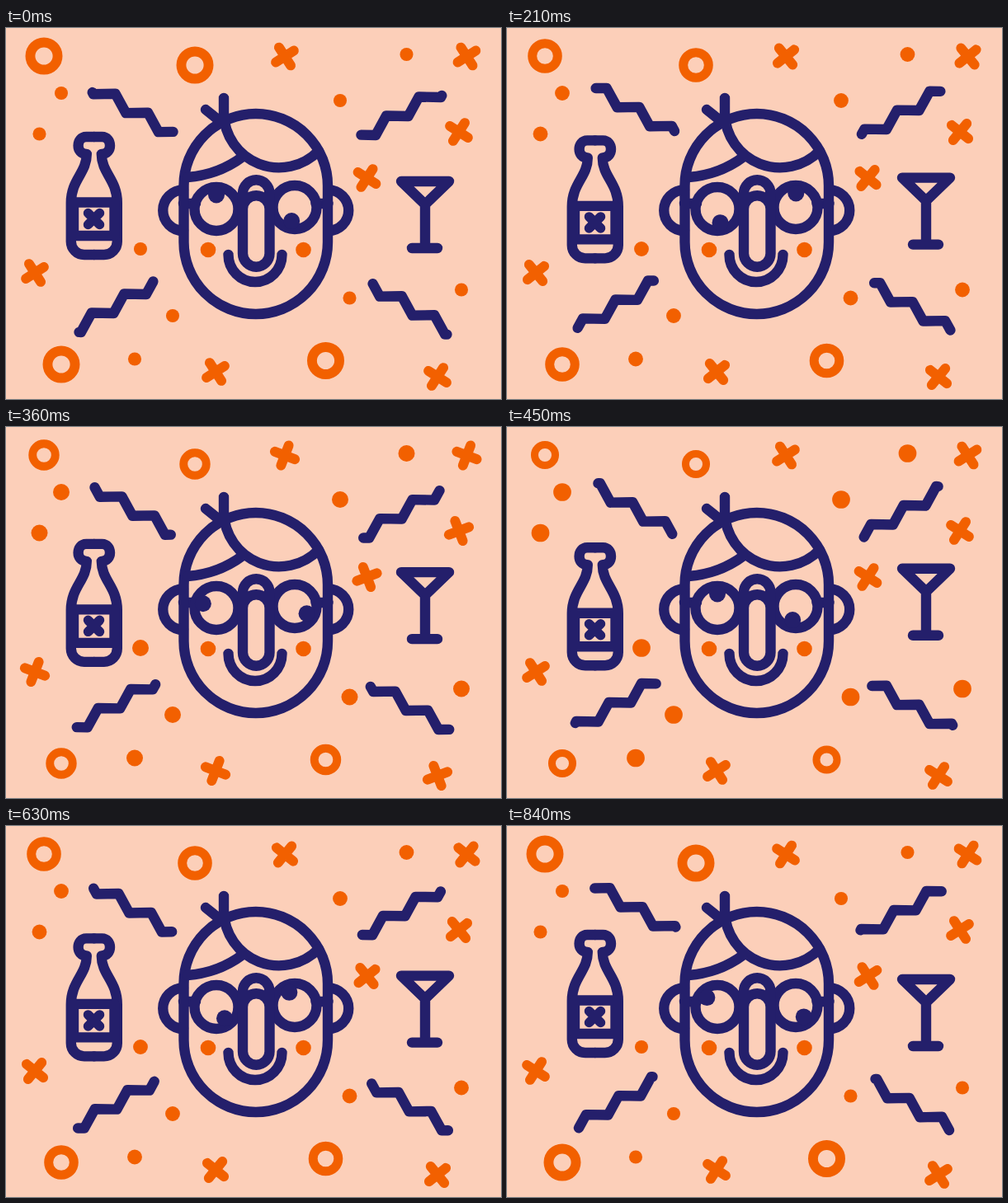
An HTML page for the animation above (0.9 s loop, 600 by 450 pixels).

```html
<!DOCTYPE html>
<html lang="en">
<head>
<meta charset="utf-8">
<title>Dizzy party face</title>
<style>
  html, body { margin: 0; width: 100%; height: 100%; overflow: hidden; background: #fccfb9; }
  svg { display: block; width: 600px; height: 450px; }
  .ink { fill: none; stroke: #241f6b; stroke-width: 12.4; stroke-linecap: round; stroke-linejoin: round; }
  .pupil { fill: #241f6b; stroke: none; }
  .dot { fill: #f26000; stroke: none; }
  .line { fill: none; stroke: #f26000; stroke-width: 11.9; stroke-linecap: round; }
</style>
</head>
<body>
<svg viewBox="0 0 600 450">
  <defs>
    <circle id="ring" class="line" r="16.600"/>
    <circle id="dot" class="dot"/>
    <path id="cross" class="line" d="M-13 0H13M0-13V13"/>
    <path id="wave"/>
    <path id="flank" d="M0 132H-9.500C-22 132-23 153-9 153C-9 176-28 184-28 212V259a16 16 0 0 0 16 16H0"/>
    <g id="side">
      <path d="M215 196.500a24.750 24.750 0 0 0 0 49.500M215 213H230"/>
      <circle class="dot" cx="245" cy="269" r="9.300"/>
    </g>
  </defs>

  <g>
    <use href="#ring" x="46" y="34"/>
    <use href="#ring" x="229" y="45"/>
    <use href="#ring" x="67" y="408"/>
    <use href="#ring" x="387.500" y="403.500"/>
  </g>
  <g>
    <use href="#dot" x="67" y="79"/>
    <use href="#dot" x="40.500" y="128.500"/>
    <use href="#dot" x="405" y="88"/>
    <use href="#dot" x="485.500" y="32"/>
    <use href="#dot" x="163" y="268"/>
    <use href="#dot" x="202" y="349"/>
    <use href="#dot" x="156" y="401.500"/>
    <use href="#dot" x="416.500" y="327.500"/>
    <use href="#dot" x="552" y="317.500"/>
  </g>
  <g>
    <use href="#cross" x="338" y="34.500"/>
    <use href="#cross" x="558.500" y="34.500"/>
    <use href="#cross" x="35" y="297"/>
    <use href="#cross" x="254" y="417"/>
  </g>
  <!-- mirrored crosses spin the other way -->
  <g transform="scale(-1 1)">
    <use href="#cross" x="-549" y="126"/>
    <use href="#cross" x="-437.500" y="182"/>
    <use href="#cross" x="-523" y="423"/>
  </g>

  <g class="ink">
    <use href="#wave" transform="translate(154.500 100.500) rotate(30.200)"/>
    <use href="#wave" transform="translate(478.500 104.300) scale(-1 1) rotate(30.200)"/>
    <use href="#wave" transform="translate(132.600 336.700) rotate(-30.200)"/>
    <use href="#wave" transform="translate(490.400 339.400) scale(-1 1) rotate(-30.200)"/>
  </g>

  <g class="ink" id="bottle">
    <use href="#flank" x="106.800"/>
    <use href="#flank" x="-106.800" transform="scale(-1 1)"/>
    <path d="M82 211.500H131.500V252H82Z"/>
    <path d="M99.500 224.500l14 14m0-14l-14 14" stroke-width="11.500"/>
  </g>

  <path class="ink" id="glass" d="M479 186H537L508 214ZM508 214V267M492 267H523"/>

  <g class="ink">
    <use href="#side"/>
    <use href="#side" transform="translate(605.500) scale(-1 1)"/>
    <rect x="215.500" y="104" width="174.500" height="243" rx="87.250"/>
    <path d="M264 85V104A67 67 0 0 0 379 149M242 99L262 115M220 181Q258 178 287 156"/>
    <circle cx="255" cy="219.500" r="26.500"/>
    <circle cx="350" cy="217.500" r="26.500"/>
    <circle class="pupil" id="left" r="10"/>
    <circle class="pupil" id="right" r="10"/>
    <path d="M287 219.500a16.250 16.250 0 0 1 32.500 0V273.500a16.250 16.250 0 0 1-32.500 0ZM287 219V200.500a16.250 16.250 0 0 1 32.500 0V219"/>
    <path d="M269.500 275a32.500 33 0 0 0 65 0"/>
  </g>
</svg>
<script>
  const TAU = Math.PI * 2;
  const $ = id => document.getElementById(id);
  const set = (id, name, value) => $(id).setAttribute(name, value);

  const HALF = 54.3;   // half length of the wave's window
  const SEG = 22.85;   // length of one stroke of the zigzag
  const AMP = 6.9;

  // Triangle wave running through a fixed window
  function zigzag(shift) {
    const point = u => {
      const p = (((u - shift) / SEG) % 2 + 2) % 2;
      return `${u.toFixed(2)} ${(AMP * (1 - 2 * Math.abs(1 - p))).toFixed(2)}`;
    };
    const points = [point(-HALF)];
    const first = shift + Math.ceil((-HALF - shift) / SEG) * SEG;
    for (let u = first; u < HALF; u += SEG) points.push(point(u));
    points.push(point(HALF));
    return 'M' + points.join('L');
  }

  function look(id, x, y, degrees) {
    const a = degrees * TAU / 360;
    set(id, 'cx', x + 17 * Math.cos(a));
    set(id, 'cy', y + 17 * Math.sin(a));
  }

  function draw(ms) {
    const step = Math.min(28, Math.floor(ms % 900 / 30));
    const beat = (1 - Math.cos((step + 1) / 10 * TAU)) / 2;
    const drift = 17.6 * (beat - 0.095);

    set('bottle', 'transform', `translate(0 ${drift})`);
    set('glass', 'transform', `translate(0 ${-drift})`);
    set('ring', 'transform', `scale(${1.026 - 0.3 * beat})`);
    set('dot', 'r', 7.7 + 3.5 * beat);
    set('cross', 'transform', `rotate(${57 + 12 * step})`);
    set('wave', 'd', zigzag(-29.4 + step * SEG / 5));
    look('left', 255, 219.5, -90 + 24 * step);
    look('right', 350, 217.5, 103 + 24 * step);
  }

  const start = performance.now();
  function tick() {
    draw(performance.now() - start);
    requestAnimationFrame(tick);
  }
  tick();
</script>
</body>
</html>
```
